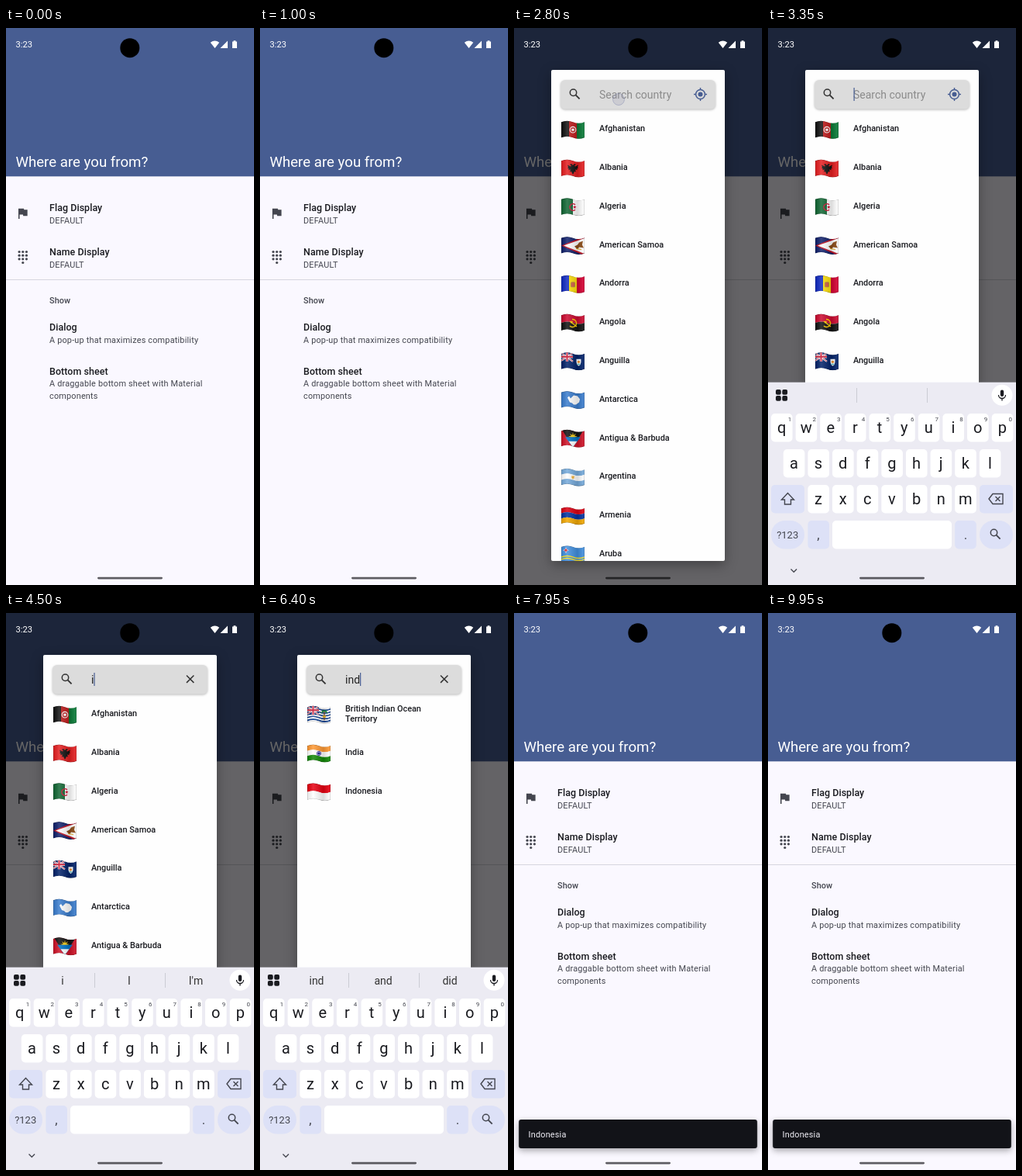
These frames come from a looping animation (320 px wide and 718 px high, 10000 ms). An HTML page:

```html
<!DOCTYPE html>
<html lang="en">
<head>
<meta charset="utf-8">
<title>Country picker</title>
<style>
  html, body { margin: 0; height: 100%; overflow: hidden; background: #faf8ff; }
  svg { display: block; width: 100vw; height: 100vh; font-family: Roboto, sans-serif; }
  #dialog { filter: drop-shadow(0 5px 8px #0005); }
  #field { filter: drop-shadow(0 1.5px 1.5px #0004); }
  #snackbar { filter: drop-shadow(0 3px 4px #0005); transform-origin: 160px 671px; }
</style>
</head>
<body>
<svg viewBox="0 0 320 718">
  <defs>
    <clipPath id="wave"><path d="M0 0q7.5-3 15 0t15 0v20q-7.5 3-15 0t-15 0z"/></clipPath>
    <clipPath id="list"><rect x="48" y="54" width="224" height="633"/></clipPath>
    <clipPath id="row"><rect y="364" width="320" height="56.5"/></clipPath>
    <linearGradient id="shade">
      <stop offset="0" stop-color="#000" stop-opacity=".08"/>
      <stop offset=".25" stop-color="#fff" stop-opacity=".15"/>
      <stop offset=".7" stop-color="#000" stop-opacity=".14"/>
      <stop offset="1" stop-color="#fff" stop-opacity=".1"/>
    </linearGradient>
  </defs>
  <g id="main"></g>
  <circle id="ripple" cx="118" cy="394" fill="#000" fill-opacity=".1" clip-path="url(#row)"/>
  <g id="snackbar"></g>
  <rect id="scrim" width="320" height="718"/>
  <g id="dialog">
    <rect x="48" y="54" width="224" height="633" rx="2" fill="#fefefe"/>
    <g id="rows" clip-path="url(#list)"></g>
    <rect id="field" x="60" y="67" width="200" height="37.5" rx="6" fill="#dcdcdc"/>
    <g id="search"></g>
  </g>
  <g id="keyboard"><g id="keys"></g><g id="hints"></g></g>
  <g id="status"></g>
  <circle id="touch" r="7.5" fill="#8c8caa" fill-opacity=".2" stroke="#6e78aa" stroke-opacity=".35"/>
</svg>
<script>
const el = id => document.getElementById(id);
const text = (x, y, s, size, fill, more = '') =>
  `<text x="${x}" y="${y}" font-size="${size}" fill="${fill}" ${more}>${s}</text>`;
const rect = (x, y, w, h, fill, r = 0) =>
  `<rect x="${x}" y="${y}" width="${w}" height="${h}" rx="${r}" fill="${fill}"/>`;
const disc = (x, y, r, fill) => `<circle cx="${x}" cy="${y}" r="${r}" fill="${fill}"/>`;
const shape = (d, fill) => `<path d="${d}" fill="${fill}"/>`;
const line = (d, stroke, w = 1.5) =>
  `<path d="${d}" fill="none" stroke="${stroke}" stroke-width="${w}"/>`;

// Flags live in a 30 x 20 box whose horizontal edges follow a wave.
const band = (y, h, c) => shape(`M0 ${y}q7.5-3 15 0t15 0v${h}q-7.5 3-15 0t-15 0z`, c);
const bands = (...cs) => cs.map((c, i) => band(i * 20 / cs.length, 20 / cs.length, c)).join('');
const columns = (...cs) => cs.map((c, i) => rect(i * 30 / cs.length, -3, 30 / cs.length, 26, c)).join('');
const star = (x, y, r, c, n = 5) => {
  let d = '';
  for (let i = 0; i < 2 * n; i++) {
    const a = i * Math.PI / n, q = i % 2 ? r * .42 : r;
    d += (i ? 'L' : 'M') + (x + q * Math.sin(a)).toFixed(2) + ' ' + (y - q * Math.cos(a)).toFixed(2);
  }
  return shape(d + 'z', c);
};
const jack = rect(0, -3, 15, 13, '#012169') + line('M0-1L15 10M15-1L0 9', '#fff', 2.2) +
  line('M0-1L15 10M15-1L0 9', '#c8102e', .8) + line('M7.5-3V10M0 4H15', '#fff', 3.4) +
  line('M7.5-3V10M0 4H15', '#c8102e', 2);
const shield = (x, y, a, b) => shape(`M${x - 3} ${y - 4}h6v4q0 3-3 5q-3-2-3-5z`, a) + disc(x, y - .5, 1.6, b);

const flags = {
  'Afghanistan': columns('#111', '#be1a1a', '#087a36') +
    '<circle cx="15" cy="10" r="3.8" fill="none" stroke="#fff" stroke-width="1.1"/>' + rect(13.3, 8.5, 3.4, 3, '#fff'),
  'Albania': bands('#e41e20') +
    shape('M15 6l-2-2-2 1 2 1.5-1 1-4-2 1 3-1 1 2 1-1 1.500 3-.5-1 3 2-.500 2 4 2-4 2 .5-1-3 3 .5-1-1.500 2-1-1-1 1-3-4 2-1-1 2-1.500-2-1z', '#111'),
  'Algeria': columns('#116633', '#fff') + line('M18 7a4.300 4.300 0 1 0 0 6.500', '#d21034', 1.4) + star(17.3, 10.2, 2.4, '#d21034'),
  'American Samoa': bands('#10206b') + shape('M0 10L30-2V23z', '#bd1021') + shape('M3 10L30 .5V20.500z', '#fff') +
    shape('M17 11l4-2 2-3 5-2-1 5 2 4-6-1-2 3z', '#8a4b16') + line('M19 14l7 1', '#e8b020', 1),
  'Andorra': columns('#1029c0', '#fcdd09', '#d50032') + rect(12, 7, 6, 7, '#b98a35', 1.5) + rect(13, 8, 4, 5, '#d55b42'),
  'Angola': bands('#cc092f', '#111') + line('M14 5.500a5 5 0 1 1-3 8.500M11 8l9 7', '#ffcb00', 1.4) + star(13.5, 9, 2, '#ffcb00'),
  'Anguilla': bands('#012169') + jack + shield(22.5, 11, '#fff', '#f2902d') + rect(20.5, 13, 4, 1.3, '#49b5c5'),
  'Antarctica': bands('#3a7dce') + shape('M8 7l2-2 2 3 4-4 5 1 3 4-1 4-4 3-3 0-2-2-3-1z', '#fff'),
  'Antigua & Barbuda': bands('#ce1126') + shape('M0-3H30L15 21z', '#111') + star(15, 8, 6, '#fcd116', 9) +
    shape('M5 8H25L15 21z', '#0072c6') + shape('M9.500 13.500H20.500L15 21z', '#fff'),
  'Argentina': bands('#75aadb', '#fff', '#75aadb') + star(15, 10, 3, '#f0ab2c', 9),
  'Armenia': bands('#d90012', '#0033a0', '#f2a800'),
  'Aruba': bands('#418fde') + band(12.5, 1.5, '#fbe122') + band(15.5, 1.5, '#fbe122') +
    star(6, 4.5, 4, '#fff', 4) + star(6, 4.5, 3, '#d22630', 4),
  'Bahrain': bands('#fff') + shape('M9-3l5 4-5 4 5 3.500-5 3.500 5 3.500-5 3.500 5 4H31V-3z', '#ce1126'),
  'Benin': bands('#fcd116', '#e8112d') + rect(0, -3, 12, 26, '#008751'),
  'Bosnia & Herzegovina': bands('#002395') + shape('M9-3H27V21z', '#fecb00') +
    [0, 1, 2, 3, 4].map(i => star(7 + i * 4, 1 + i * 4.5, 1.5, '#fff')).join(''),
  'British Indian Ocean|Territory': bands(...Array.from({ length: 11 }, (_, i) => i % 2 ? '#0a3a8c' : '#fff')) + jack +
    line('M22 5V17', '#7a4a1c', 1.2) + line('M18 8q4-6 8 0M19 5h6', '#168a3c', 1.5) + rect(20, 11, 4, 2.5, '#e8b020'),
  'British Virgin Islands': bands('#012169') + jack + shield(22.5, 11, '#0a7a35', '#fff'),
  'Burkina Faso': bands('#ef2b2d', '#009e49') + star(15, 10, 4, '#fcd116'),
  'India': bands('#ff9933', '#fff', '#128807') + star(15, 10, 2.6, '#000088', 12) +
    '<circle cx="15" cy="10" r="2.7" fill="none" stroke="#000088" stroke-width=".7"/>',
  'Indonesia': bands('#e70011', '#fff')
};

const INK = '#1a1b20', SOFT = '#44464f', BLUE = '#475d92';
const title = (y, s) => text(56, y, s, 12.44, INK, 'font-weight="500" letter-spacing=".06"');
const note = (y, s) => text(56, y, s, 10.89, SOFT, 'letter-spacing=".19"');
const pill = c => rect(118, 707.7, 84, 2.8, c, 1.4);

function buildMain() {
  let dots = disc(21.8, 302.5, 1.6, SOFT);
  for (let i = 0; i < 9; i++) dots += disc(17.1 + i % 3 * 4.67, 288.5 + (i / 3 | 0) * 4.67, 1.6, SOFT);
  el('main').innerHTML = rect(0, 0, 320, 718, '#faf8ff') + rect(0, 0, 320, 191.3, BLUE) +
    text(12.4, 179, 'Where are you from?', 18.67, '#fff') +
    `<g transform="translate(12.100 229.700) scale(.778)">${shape('M14.4 6L14 4H5v17h2v-7h5.6l.4 2h7V6z', SOFT)}</g>` + dots +
    title(236.3, 'Flag Display') + note(251.6, 'DEFAULT') +
    title(293.2, 'Name Display') + note(308.5, 'DEFAULT') +
    rect(0, 324, 320, 1, '#d6d6de') +
    text(56, 354.8, 'Show', 10.89, SOFT, 'font-weight="500" letter-spacing=".08"') +
    title(390, 'Dialog') + note(405.5, 'A pop-up that maximizes compatibility') +
    title(446.7, 'Bottom sheet') + note(462.3, 'A draggable bottom sheet with Material') +
    note(478, 'components') + pill('#5e5d62');
  el('snackbar').innerHTML = rect(6.2, 653, 307.6, 37, '#121318', 3) +
    text(18.6, 675.8, 'Indonesia', 10.89, '#f1f0f7', 'letter-spacing=".19"');
  el('status').innerHTML = text(12.4, 25, '3:23', 11.2, '#fff') + disc(159.8, 25.7, 12.5, '#000') +
    shape('M263.800 18.800q5.700-4.600 11.400 0L269.500 26z', '#fff') + shape('M286 16.500V26H276.500z', '#fff') +
    shape('M292 17.500h1.600v-1.300h2.800v1.300h1.600V26h-6z', '#fff');
}

const glass = (x, y, c) => `<circle cx="${x - 1.5}" cy="${y - 1.5}" r="4.2" fill="none" stroke="${c}" stroke-width="1.500"/>` +
  line(`M${x + 1.6} ${y + 1.6}l5 5`, c, 1.9);

function buildKeys() {
  const FN = '#dde1f7', center = 'text-anchor="middle"';
  let s = rect(0, 456.7, 320, 262, '#ecebf3');
  for (const x of [10, 18.3]) for (const y of [466, 474]) s += rect(x, y, 6.8, 6.8, INK, 2);
  s += rect(114, 464, .8, 19, '#c3c4cc') + rect(205, 464, .8, 19, '#c3c4cc');
  s += disc(302, 473.3, 13.5, '#fff') + rect(299.8, 466.5, 4.4, 8.5, INK, 2.2) +
    line('M297.500 473a4.500 4.500 0 0 0 9 0M302 477.500v3', INK, 1.3);
  [['qwertyuiop', 4, 497], ['asdfghjkl', 19.8, 543], ['zxcvbnm', 51.4, 589]].forEach(([letters, x0, y], r) =>
    [...letters].forEach((c, i) => {
      const x = x0 + i * 31.63;
      s += rect(x, y, 27.6, 36.5, '#fff', 5) + text(x + 13.6, y + 24.5, c, 20, INK, center);
      if (!r) s += text(x + 24, y + 10, (i + 1) % 10, 8, SOFT, center);
    }));
  s += rect(4, 589, 43, 36.5, FN, 5) + rect(273, 589, 43, 36.5, FN, 5) +
    rect(4, 635, 43, 36.5, FN, 18) + rect(51.4, 635, 27.6, 36.5, FN, 5) + rect(83, 635, 154, 36.5, '#fff', 5) +
    rect(241.2, 635, 27.6, 36.5, FN, 5) + rect(273, 635, 43, 36.5, FN, 18) +
    line('M25.500 599.500l-8 8.500h4v6h8v-6h4z', SOFT, 1.4) +
    line('M285 607l5-6.500h13v13h-13zM293.500 604l6 6M299.500 604l-6 6', SOFT, 1.4) +
    text(25.2, 657.8, '?123', 13, SOFT, center) + text(65, 658.5, ',', 17, SOFT, center) +
    text(255, 658.5, '.', 17, SOFT, center) + glass(293, 652, SOFT) +
    line('M29.500 697.500l3.800 3.800 3.800-3.800', SOFT, 1.3) + pill('#5a595f');
  el('keys').innerHTML = s;
}

const suggestions = { i: ['i', 'I', "I'm"], in: ['in', 'I', 'on'], ind: ['ind', 'and', 'did'] };

function showQuery(query) {
  const names = Object.keys(flags).filter(n => n.toLowerCase().includes(query)).slice(0, 12);
  el('rows').innerHTML = names.map((name, i) => {
    const y = 129.4 + i * 49.77, parts = name.split('|');
    return `<g transform="translate(61 ${y - 8.2})"><g clip-path="url(#wave)">${flags[name]}` +
      `<path d="M0 0q7.500-3 15 0t15 0v20q-7.500 3-15 0t-15 0z" fill="url(#shade)" stroke="#0004"/></g></g>` +
      parts.map((p, k) => text(110, y + 4 + (k - (parts.length - 1) / 2) * 12.6, p, 10.89, INK, 'font-weight="500"')).join('');
  }).join('');
  el('search').innerHTML = glass(78, 84.7, '#333') + text(110, 90.5, query || 'Search country', 14, query ? '#222' : '#8b8b8b', 'id="query"') +
    (query ? line('M233 80.500l9.400 9.400M242.400 80.500l-9.400 9.400', '#333', 1.5)
      : `<circle cx="240.500" cy="85.500" r="5.900" fill="none" stroke="${BLUE}" stroke-width="1.500"/>` + disc(240.5, 85.5, 3, BLUE) +
        line('M240.500 77v3M240.500 91v3M232 85.500h3M246 85.500h3', BLUE, 1.5)) +
    `<rect id="caret" x="${110.5 + (query ? el('search').querySelector('#query').getComputedTextLength() * 0 : 0)}" y="77" width="1.200" height="17" fill="${BLUE}"/>`;
  if (query) el('caret').setAttribute('x', 110 + el('query').getComputedTextLength());
  el('hints').innerHTML = (suggestions[query] || []).map((w, i) =>
    text(73 + i * 86, 478.5, w, 14, '#333', 'text-anchor="middle"')).join('');
}

// start, end, x, y
const taps = [[1600, 1950, 118, 394], [2650, 2900, 135, 92], [4200, 4350, 239, 515],
  [5000, 5150, 223, 607], [5750, 5900, 97, 561], [7150, 7350, 140, 230]];
const ramp = (t, a, b) => Math.min(1, Math.max(0, (t - a) / (b - a)));
const ease = p => 1 - (1 - p) ** 3;
const set = (id, attrs) => { for (const k in attrs) el(id).setAttribute(k, attrs[k]); };
let shown;

function draw(now) {
  const t = now % 10000;
  const query = t < 4300 ? '' : t < 5100 ? 'i' : t < 5850 ? 'in' : 'ind';
  if (query !== shown) showQuery(shown = query);

  set('ripple', { r: 260 * ease(ramp(t, 1620, 1880)), opacity: 1 - ramp(t, 2000, 2150) });
  set('scrim', { opacity: .6 * (ramp(t, 1900, 2100) - ramp(t, 7400, 7600)) });
  set('dialog', { opacity: ramp(t, 1810, 1960) - ramp(t, 7400, 7550) });

  const up = ease(ramp(t, 2950, 3250)) - ease(ramp(t, 7400, 7650));
  set('keyboard', { transform: `translate(0 ${262 * (1 - up)})` });
  const typing = t > 2900 && t < 7400;
  const lastKey = [2900, 4300, 5100, 5850].filter(k => k <= t).pop() || 0;
  set('caret', { opacity: typing && (t - lastKey) % 1000 < 560 ? 1 : 0 });

  const pop = ramp(t, 7650, 7850);
  set('snackbar', { opacity: pop });
  el('snackbar').style.transform = `scale(${.8 + .2 * ease(pop)})`;

  const tap = taps.find(([a, b]) => t >= a && t < b);
  set('touch', tap ? { cx: tap[2], cy: tap[3], opacity: 1 } : { opacity: 0 });
}

buildMain();
buildKeys();
const start = performance.now();
(function frame() {
  draw(performance.now() - start);
  requestAnimationFrame(frame);
})();
</script>
</body>
</html>
```
